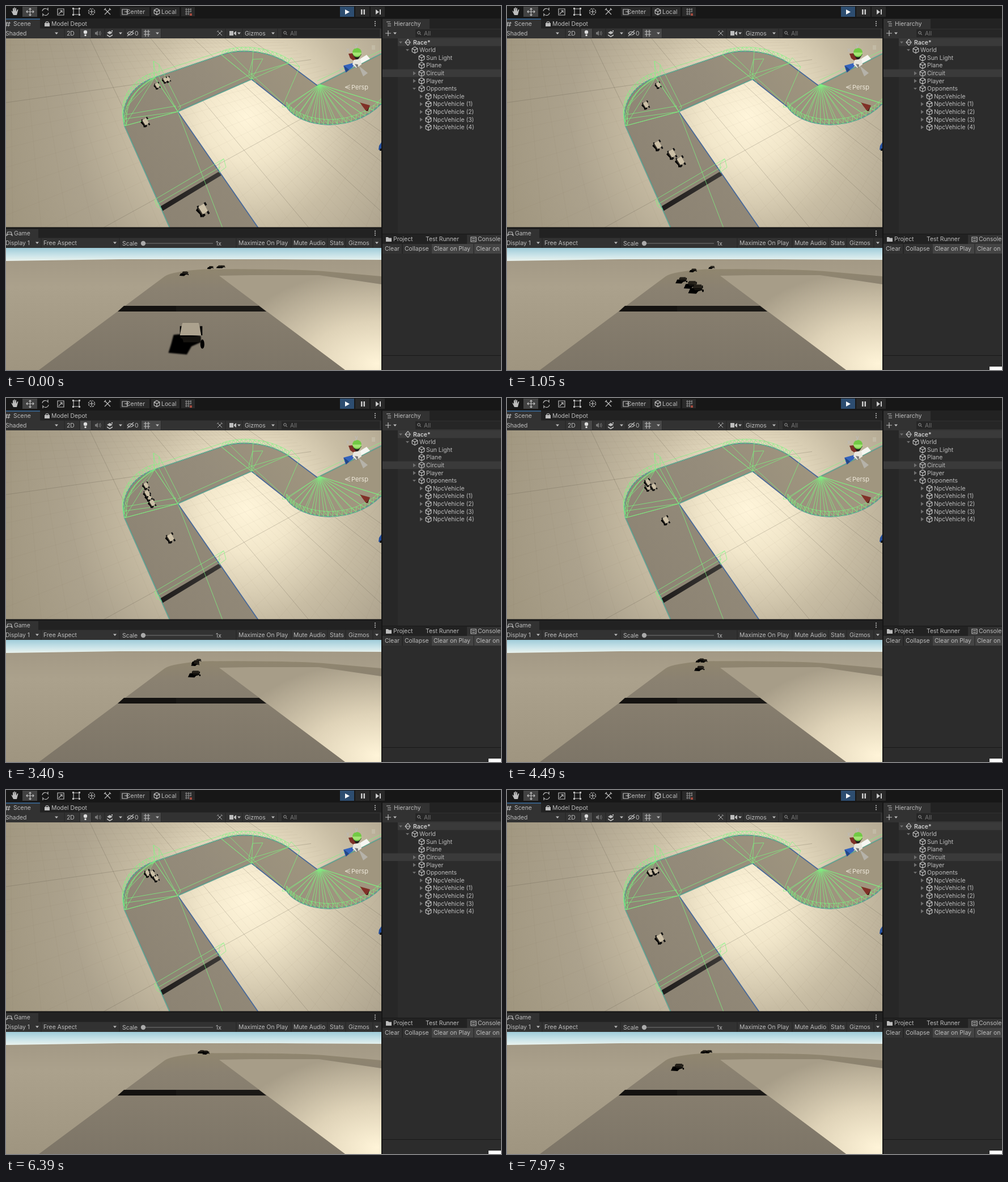
Animation, 873 px wide and 641 px high, one loop 8 s. Source, as an HTML page:

```html
<!DOCTYPE html>
<html lang="en">
<head>
<meta charset="utf-8">
<title>Race editor</title>
<style>
  html, body { margin: 0; width: 100%; height: 100%; overflow: hidden; background: #191919; }
  svg { display: block; width: 873px; height: 641px; }
  text { font: 10.4px Inter, "Open Sans", sans-serif; fill: #bcbcbc; white-space: pre; }
  .dim { fill: #777; }
  .bold { font-weight: 600; fill: #d0d0d0; }
  .icon { fill: none; stroke: #bdbdbd; stroke-width: 1.2; }
  .solid { fill: #bdbdbd; }
  .wire { fill: none; stroke: #7cf980; stroke-width: .8; opacity: .9; }
  .edge { fill: none; stroke: #48699a; stroke-width: 1.8; }
</style>
</head>
<body>
<svg viewBox="0 0 873 641">
  <defs>
    <radialGradient id="sand" gradientUnits="userSpaceOnUse" cx="425" cy="195" r="460">
      <stop offset="0" stop-color="#fff5da"/><stop offset=".17" stop-color="#f2e7cb"/>
      <stop offset=".42" stop-color="#c8bda4"/><stop offset=".68" stop-color="#aca28d"/>
      <stop offset="1" stop-color="#a0967f"/>
    </radialGradient>
    <linearGradient id="road" gradientUnits="userSpaceOnUse" x1="250" y1="380" x2="560" y2="120">
      <stop offset="0" stop-color="#8b8272"/><stop offset=".6" stop-color="#958c7b"/><stop offset="1" stop-color="#a0967f"/>
    </linearGradient>
    <linearGradient id="sky" x2="0" y2="1">
      <stop offset="0" stop-color="#9fccd9"/><stop offset=".6" stop-color="#cfe6ea"/><stop offset="1" stop-color="#edf4ee"/>
    </linearGradient>
    <linearGradient id="plain" x2="0" y2="1">
      <stop offset="0" stop-color="#a39985"/><stop offset=".25" stop-color="#aba18c"/><stop offset="1" stop-color="#9f9580"/>
    </linearGradient>
    <radialGradient id="glow" gradientUnits="userSpaceOnUse" cx="0" cy="0" r="1" gradientTransform="translate(655 630) scale(270 165)">
      <stop offset="0" stop-color="#fff4d8"/><stop offset=".45" stop-color="#dfd3b8"/><stop offset="1" stop-color="#a79d88"/>
    </radialGradient>
    <linearGradient id="track" x2="0" y2="1">
      <stop offset="0" stop-color="#90866f"/><stop offset=".2" stop-color="#8a8171"/><stop offset="1" stop-color="#7d7567"/>
    </linearGradient>
    <linearGradient id="bar"><stop offset="0" stop-color="#1e1c1b"/><stop offset="1" stop-color="#3b3835"/></linearGradient>
    <filter id="soft"><feGaussianBlur stdDeviation="1.2"/></filter>
    <clipPath id="sceneClip"><path d="M0 57H662V390.500H0z"/></clipPath>
    <clipPath id="gameClip"><path d="M0 426H662V641H0z"/></clipPath>
    <g id="cube" class="icon" stroke-width="1"><path d="M0-5.500 4.800-2.800V2.800L0 5.500-4.800 2.800V-2.800zM-4.800-2.800 0 0 4.800-2.800M0 0V5.500"/></g>
    <path id="down" d="M-3-1.500H3L0 2z"/>
    <path id="right" d="M-2-3.500 3 0-2 3.500z"/>
    <g id="lens" fill="none" stroke="#999"><circle r="2.300"/><path d="M2 2 4 4"/></g>
    <g id="kebab" class="solid"><circle cy="-3.500" r="1.100"/><circle r="1.100"/><circle cy="3.500" r="1.100"/></g>
    <path id="tools" class="icon" stroke-width="1.800" d="M-5-5 5 5M5-5-5 5M-6-3-3-6M3-6 6-3"/>
    <g id="topCar">
      <path d="M-8-3-11 2-4 9-3 14 3 13 6 10z"/>
      <path d="M-8-6-6-1M4-12 7-7M9 3 12 8M0 10 3 13" stroke="#111" stroke-width="3.500"/>
      <path d="M-7-4 3-10 10 3 1 9z" fill="#cbbfa6"/><path d="M-7-4 1 9 0 11-8-1z" fill="#3a352d"/>
    </g>
    <g id="rearCar">
      <path d="M-29-1-8-3 18 1 18 12 2 19-6 33-38 30-33 14z" filter="url(#soft)"/>
      <path d="M-17 2H18V12H-17z" fill="#15130f"/>
      <path d="M-18-16h4V0h-4zM17-16h4V0h-4z"/>
      <ellipse cx="-16" cy="13" rx="4" ry="8"/><ellipse cx="21" cy="15" rx="3.500" ry="8"/>
      <path d="M-14-22H15L19 0H-18z" fill="#242019"/>
      <path class="roof" d="M-14-22H15L19 0H-18z" fill="#aca28e"/>
    </g>
  </defs>

  <g clip-path="url(#sceneClip)">
    <path d="M0 57H662V391H0z" fill="url(#sand)"/>
    <g id="grid" fill="none" stroke="#5e5848"></g>
    <path fill="url(#road)" d="M289 391 209 211C200 170 225 139 262 126L380 86C410 75 460 77 497 101L549 140 662 84V172C610 225 520 215 495 178L433 129 303 186 445 391z"/>
    <path d="M272 353 375 292 380 298 276 361z" fill="url(#bar)"/>
    <path class="edge" d="M289 391 209 211C200 170 225 139 262 126L380 86C410 75 460 77 497 101L549 140 662 84M445 391 303 186 433 129 495 178C520 215 610 225 662 172"/>
    <g id="wires" class="wire">
      <path d="M289 391 209 211M303 186 382 391M262 341 384 269 388 284 376 293M262 341 266 353 275 358M262 341 273 353M384 269 376 277V293M266 349 379 283M260 97 270 103 308 178 303 186 262 126zM260 97 262 110 303 186M270 103V122M208 199 303 186M209 211 303 186M213 191 300 176M303 186 433 129M303 178 433 120M433 129 453 93 435 94 428 120 441 136M433 129 380 86M433 120 390 78M433 120 497 101M497 101 518 107 487 178 495 178M518 107 503 91 497 101M262 126 380 86M262 118 380 80M549 140 662 84M549 132 662 78M488 170 433 120"/>
    </g>
    <g id="sceneCars"></g>
    <path d="M624 170 642 175 635 185z" fill="#813027"/><path d="M642 175 638 185 635 185z" fill="#4d1a15"/>
    <path d="M662 240 658 246 657 253 662 255z" fill="#244f9d"/><path d="M660 251H662V255H659z" fill="#111"/>
    <g>
      <path d="M618 100 607 92 604 84 613 83 620 97z" fill="#7d2f26"/><path d="M611 85H627L619 97z" fill="#24231f"/>
      <circle cx="619" cy="82" r="8" fill="#72c945"/><path d="M611 82a8 6 0 0 0 16 0z" fill="#a4e474"/>
      <path d="M617 99 595 105 599 117 611 108z" fill="#3564bd"/><path d="M596 105 600 117 605 112z" fill="#234785"/>
      <path d="M618 97 636 86 642 93 625 102z" fill="#f6f6f1"/><path d="M622 105 638 118 630 124z" fill="#b5b2a9"/>
      <path d="M613 95 625 93 627 103 618 109 611 103z" fill="#e9e7df"/><path d="M615 102 621 103 620 110z" fill="#777"/>
      <path d="M645 69h6v8h-6z" fill="#ccc5b4" opacity=".5"/>
      <g fill="#fff"><text class="axis" x="600" y="81" fill="#fff">x</text><text x="615" y="73">y</text><text x="587" y="116">z</text></g>
      <path d="M607 139 598 143 607 147M599 143H607" fill="none" stroke="#e3decf"/>
      <text x="609" y="147" style="fill:#eee8da;font-size:11px">Persp</text>
    </g>
  </g>

  <g clip-path="url(#gameClip)">
    <path d="M0 426H662V450H0z" fill="url(#sky)"/>
    <path d="M0 449 200 446H480L662 447V641H0z" fill="url(#plain)"/>
    <path d="M376 475 430 473H552L662 490V641H598z" fill="url(#glow)"/>
    <path d="M58 641 280 476Q294 467 350 463.500 480 462 560 467L662 476V490L552 474H430L376 475 598 641z" fill="url(#track)"/>
    <path d="M208 528H446L459 538H197z" fill="#141210"/><path d="M300 528H446L459 538H300z" fill="#23201d" opacity=".5"/>
    <g id="gameCars"></g>
  </g>

  <!-- top bar and scene header -->
  <path d="M0 0H873V22H0z" fill="#171717"/>
  <path d="M0 22H873V40H0z" fill="#222"/>
  <path d="M0 23H60V40H0zM664 23H747V40H664z" fill="#323232"/>
  <path d="M0 23H60" stroke="#3a6ea0" stroke-width="1.500"/>
  <path d="M0 39.500H662V57H0z" fill="#323232"/>
  <path d="M29 1H55V19H29z" fill="#424242"/>
  <path d="M201 2H253V18H201zM256 2H306V18H256zM309 2H333V18H309zM616 1H641V19H616zM643 1H668V19H643z" fill="#292929"/>
  <path d="M589 1H614V19H589z" fill="#2d4d70"/>
  <path d="M598 6V15L606 10.500z" fill="#fff"/>
  <path d="M626 6h2.500v9h-2.500zM630.500 6h2.500v9h-2.500zM652 6V15L658 10.500zM659 6h2v9h-2z" fill="#ccc"/>
  <path class="solid" d="M9 8 12 10V4h1.500V9L14 2.500h1.500V9L16.500 3.500H18V10L20 6 21.500 6.500 19 16H13z"/>
  <path class="icon" d="M36 10H49M42.500 4V17M38 8 36 10 38 12M47 8 49 10 47 12M40.500 6 42.500 4 44.500 6M40.500 15 42.500 17 44.500 15M64 9A5.500 5.500 0 0 1 74 7V3M75 12A5.500 5.500 0 0 1 65 14V18M91 5H102V16H91zM93 14 99 8M95 8H99V12M119 5H129V15H119z"/>
  <path class="solid" d="M117 3h3v3h-3zM128 3h3v3h-3zM117 14h3v3h-3zM128 14h3v3h-3z"/>
  <circle class="icon" cx="151" cy="10" r="5.500" stroke-dasharray="3 1.300"/><path class="icon" d="M147 10H155M151 6V14"/>
  <use href="#tools" x="179" y="10"/>
  <path class="icon" d="M205 6H214V15H205zM209 10H217"/><use href="#cube" x="266" y="10"/>
  <path class="icon" d="M316 6H327M316 10H327M316 14H323M318 4V16M322 4V16M326 4V11" opacity=".65"/>
  <path d="M324 13h4v4h-4z" fill="#a44c40"/>
  <path class="icon" d="M2 28 0 36M6 28 4 36M0 30H8M0 34H7"/><path class="solid" d="M68 30H77V36H68z"/><path class="icon" d="M70 30a2.500 2.500 0 0 1 5 0"/>
  <use href="#kebab" x="651" y="31"/>
  <path d="M103 40V56M130 40V56M151 40V56M174 40V56M210 40V56M238 40V56M273 40V56M387 40V56M417 40V56M479 40V56" stroke="#242424"/>
  <path d="M131 40H150V56H131zM239 40H273V56H239z" fill="#484848"/>
  <circle cx="140" cy="46" r="3.200" fill="#ddd"/><path d="M138.500 50h3v3h-3z" fill="#ddd"/>
  <path d="M157 46h2l3-2.500v9L159 50h-2z" fill="#777"/><path d="M164 45q2 3 0 6M166 44q2.500 4 0 8" fill="none" stroke="#777"/>
  <path class="solid" d="M178 47 183 44 188 47 183 50zM178 50 183 53 188 50V52L183 55 178 52zM186 43h2v2h-2z"/>
  <path class="icon" d="M214 48q5-6 11 0-6 6-11 0M214 53 225 43M243 45H254M243 50H254M246 42V54M251 42V54"/>
  <use href="#tools" x="377" y="48" transform="translate(75.400 9.600) scale(.8)"/><path class="solid" d="M394 44h7v8h-7zM402 47l4-3v8l-4-3z"/>
  <path d="M486 41H659V55H486z" fill="#262626"/><use href="#lens" x="492" y="47"/>

  <!-- hierarchy -->
  <path d="M662 22H664V641H662z" fill="#151515"/>
  <path d="M664 40H873V402H664z" fill="#2c2c2c"/><path d="M664 57H691V402H664z" fill="#272727"/>
  <path d="M664 40H873V57H664z" fill="#323232"/><path d="M722 41H873V55H722z" fill="#262626"/><use href="#lens" x="728" y="47"/>
  <path d="M691 57H873V70.500H691zM664 111.500H873V125H664z" fill="#3a3a3a"/>
  <path class="icon" d="M671 28H678M673 31.500H679M673 35H679M669 48H679M674 43V53"/>
  <path class="icon" d="M709 58.500 704 64 709 69.500M704 64H713M709 58.500 713 64 709 69.500"/>
  <g id="tree"></g>

  <!-- game header -->
  <path d="M0 390.500H662V409H0z" fill="#222"/><path d="M0 393H57V409H0z" fill="#323232"/>
  <path d="M0 408.500H662V426H0z" fill="#323232"/><path d="M0 390.500H662" stroke="#151515" stroke-width="2"/>
  <path class="icon" d="M1 404 3 398H9L11 404 8 402H4z"/><use href="#kebab" x="651" y="400"/>
  <path d="M62 409V426M200 409V426M406 409V426M503 409V426M567 409V426M599 409V426M647 409V426" stroke="#252525"/>
  <path d="M246 418H365" stroke="#606060" stroke-width="1.500"/><circle cx="242" cy="418" r="4.200" fill="#aaa"/>

  <!-- console -->
  <path d="M664 402H873V419H664z" fill="#222"/><path d="M813 403H873V419H813z" fill="#323232"/>
  <path d="M664 419H873V436H664z" fill="#323232"/><path d="M751 419H824V436H751zM826 419H873V436H826z" fill="#444"/>
  <path d="M664 436H873V641H664z" fill="#2c2c2c"/><path d="M664 401.500H873M664 615.500H873M699 419V436" stroke="#191919"/>
  <path class="solid" d="M670 407h4l1 1.500h5V415h-10z"/><path class="icon" d="M820 407H829V415H820zM822 409.500H827M822 412.500H827"/>

  <g id="arrows" class="solid"></g>
  <g id="labels"></g>
  <path id="toast" d="M851 635H873V641H851z" fill="#fff"/>
</svg>
<script>
const $ = id => document.getElementById(id);
function add(parent, tag, attrs, text) {
  const el = document.createElementNS("http://www.w3.org/2000/svg", tag);
  for (const k in attrs) el.setAttribute(k, attrs[k]);
  if (text) el.textContent = text;
  return parent.appendChild(el);
}

const labels = [
  [212, 14, "Center"], [274, 14, "Local"], [13, 35, "Scene"], [80, 35, "Model Depot"],
  [-1, 52, "Shaded"], [107, 52, "2D"], [227, 52, "0"], [421, 52, "Gizmos"], [501, 52, "All", "dim"],
  [684, 35, "Hierarchy"], [737, 52, "All", "dim"], [14, 404, "Game"], [-1, 421, "Display 1"],
  [66, 421, "Free Aspect"], [205, 422, "Scale"], [370, 422, "1x"], [410, 421, "Maximize On Play"],
  [507, 421, "Mute Audio"], [571, 421, "Stats"], [604, 421, "Gizmos"], [683, 414, "Project"],
  [740, 414, "Test Runner"], [832, 414, "Console"], [668, 431, "Clear"], [703, 431, "Collapse"],
  [754, 431, "Clear on Play"], [829, 431, "Clear on Error"]
];
for (const [x, y, s, c = ""] of labels) add($("labels"), "text", { x, y, class: c }, s);

const arrows = [[89, 48], [202, 48], [267, 48], [411, 48], [471, 48], [686, 48], [55, 417], [192, 417], [654, 417]];
for (const [x, y] of arrows) add($("arrows"), "use", { href: "#down", x, y });

// depth, name, fold arrow
const tree = [[0, "Race*", "down"], [1, "World", "down"], [2, "Sun Light"], [2, "Plane"], [2, "Circuit", "right"],
  [2, "Player", "right"], [2, "Opponents", "down"]];
for (let i = 0; i < 5; i++) tree.push([3, "NpcVehicle" + (i ? ` (${i})` : ""), "right"]);
tree.forEach(([depth, name, fold], i) => {
  const x = 718 + depth * 12, y = 64 + i * 13.6;
  add($("tree"), "text", { x: x - (depth ? 1 : 0), y: y + 3.6, class: depth ? "" : "bold" }, name);
  if (depth) add($("tree"), "use", { href: "#cube", x: x - 9, y });
  if (fold) add($("tree"), "use", { href: "#" + fold, x: x - 22, y, fill: "#707070" });
});

// Track plane: u runs across the road, s along it.
const depthAt = (u, s) => 1 + .2658 * u + .3213 * s;
function toScene(u, s) {
  const w = depthAt(u, s);
  return [(204.7 * u + 1.2 * s + 275) / w, (16.4 * u - 78.2 * s + 357) / w];
}
function toTrack(x, y) {
  const a = 204.7 - .2658 * x, b = 1.2 - .3213 * x, c = 16.4 - .2658 * y, d = -78.2 - .3213 * y;
  const p = x - 275, q = y - 357, det = a * d - b * c;
  return [(p * d - b * q) / det, (a * q - p * c) / det];
}
function gridLine(i, along, major) {
  const pts = [];
  for (let k = -6; k <= 9; k += .5) {
    const [u, s] = along ? [i, k] : [k, i];
    if (depthAt(u, s) > .25) pts.push(toScene(u, s).map(v => v.toFixed(1)));
  }
  add($("grid"), "path", { d: "M" + pts.join("L"), opacity: major ? .4 : .09, "stroke-width": major ? .7 : .6 });
}
for (let n = -20; n <= 32; n++) for (const along of [true, false]) gridLine(n * .2 + .1, along, n % 8 == 0);

// Collider wireframes along the bends
function bend(p, n, lift, hub, every) {
  const at = t => [0, 1].map(k => {
    const r = 1 - t;
    return r * r * r * p[k] + 3 * r * r * t * p[k + 2] + 3 * r * t * t * p[k + 4] + t * t * t * p[k + 6];
  });
  let low = [], high = [], zig = [], fan = "";
  for (let i = 0; i <= n; i++) {
    const [x, y] = at(i / n), top = [x + lift[0], y + lift[1]];
    low.push([x, y]); high.push(top); zig.push([x, y], top);
    if (i % every == 0) fan += `M${hub}L${i % 2 ? top : [x, y]}`;
  }
  add($("wires"), "path", { d: "M" + low.join("L") + "M" + high.join("L") + "M" + zig.join("L") + fan });
}
bend([209, 211, 200, 170, 225, 139, 262, 126], 16, [-2, -9], [303, 186], 16);
bend([209, 211, 204, 174, 230, 143, 262, 126], 12, [4, -3], [262, 126], 4);
bend([380, 86, 410, 75, 460, 77, 497, 101], 16, [2, -7], [433, 129], 8);
bend([495, 178, 520, 215, 610, 225, 662, 172], 24, [0, -9], [553, 138], 1);

// Each car: a list of runs, each run a list of [ms, x, y] in the scene view.
const START = [346, 358];
const cars = [
  [[[0, 266, 140], [1050, 266, 139], [2370, 272, 136]],
   [[2370, ...START], [3400, 289, 246], [4490, 279, 215], [6390, 264, 155], [8000, 254, 145]]],
  [[[0, 245, 204], [1050, 244, 174], [2400, 246, 159], [3400, 246, 154], [4490, 247, 148], [6950, 250, 145]],
   [[6950, ...START], [7970, 269, 261], [8000, 268, 259]]],
  [[[0, ...START], [1050, 265, 245], [2400, 252, 217], [3400, 251, 174], [4490, 248, 157], [6390, 257, 147], [8000, 262, 142]]],
  [[[0, 285, 129], [60, 286, 129]],
   [[60, ...START], [1050, 290, 260], [2400, 263, 209], [3400, 248, 168], [4490, 248, 149], [6390, 249, 147], [8000, 252, 145]]],
  [[[0, 280, 130], [200, 283, 129]],
   [[200, ...START], [1050, 305, 273], [2400, 265, 210], [3400, 257, 185], [4490, 258, 156], [6390, 258, 148], [8000, 261, 143]]]
].map(runs => {
  const scene = add($("sceneCars"), "use", { href: "#topCar" });
  const game = $("gameCars").appendChild($("rearCar").cloneNode(true));
  game.removeAttribute("id");
  return { runs, scene, game, roof: game.querySelector(".roof") };
});

function place(runs, t) {
  const run = runs.findLast(r => r[0][0] <= t);
  const i = Math.max(1, run.findIndex(k => k[0] > t));
  const [t0, x0, y0] = run[i - 1], [t1, x1, y1] = run[i];
  let p = (t - t0) / (t1 - t0);
  if (i == 1 && x0 == START[0]) p = p * p * (3 - 2 * p);
  return [x0 + (x1 - x0) * p, y0 + (y1 - y0) * p];
}

function draw(now) {
  const t = now % 8000;
  for (const { runs, scene, game, roof } of cars) {
    const [x, y] = place(runs, t), [u, s] = toTrack(x, y);
    const size = Math.pow(1.06 / depthAt(u, s), 1.3);
    scene.setAttribute("transform", `translate(${x} ${y}) scale(${size})`);
    const drop = 57.2 / (s + .59), k = drop / 140;
    const gx = 328 + (u - .455) * 2.656 * drop, gy = 438 + drop - 5 * Math.max(0, 1 - k);
    game.setAttribute("transform", `translate(${gx} ${gy}) scale(${k} ${k * (.4 + .6 * k)})`);
    roof.setAttribute("opacity", Math.min(1, Math.max(0, (k - .45) / .35)));
  }
  $("toast").setAttribute("visibility", t > 400 ? "visible" : "hidden");
}
const begin = performance.now();
function tick() {
  draw(performance.now() - begin);
  requestAnimationFrame(tick);
}
tick();
</script>
</body>
</html>
```
